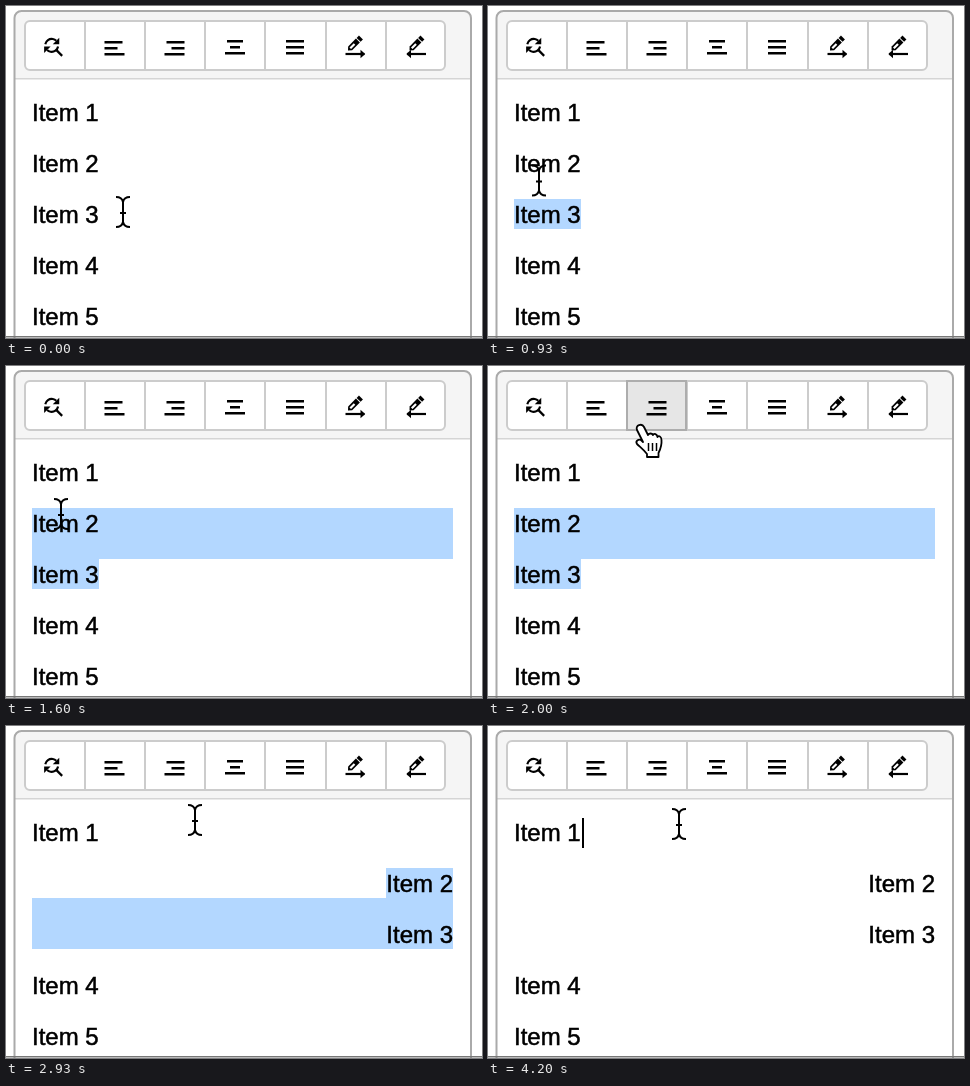
An HTML page with a canvas for the animation above (4.54 s loop, 476x332 px).

```html
<!DOCTYPE html>
<html lang="en">
<head>
<meta charset="utf-8">
<title>Aligning list items</title>
<style>
html, body { margin: 0; width: 100%; height: 100%; overflow: hidden; background: #fff; }
canvas { display: block; width: 476px; height: 332px; }
</style>
</head>
<body>
<canvas id="stage" width="476" height="332"></canvas>
<script>
const ctx = document.getElementById('stage').getContext('2d');
const LOOP = 4540;
const LEFT = 26, RIGHT = 447, PITCH = 51;
const INK = '#000', SELECTED = '#b3d7ff';

// Pointer samples: time, x, y
const POINTER = [
  [0, 117, 206], [800, 101, 204], [870, 74, 191], [930, 51, 174.5],
  [1000, 40, 161], [1070, 32, 151], [1130, 28, 147],
  [1600, 55, 148], [1670, 72, 131], [1730, 95, 112], [1800, 118, 93],
  [1870, 136, 77], [1930, 147, 67], [2000, 152, 60], [2070, 154, 58],
  [2670, 157, 61], [2730, 166, 69], [2800, 176, 80], [2870, 184, 89],
  [2930, 189, 94], [3000, 191, 97], [3070, 191, 98]
];

const within = (t, from, to) => t >= from && t < to;

function rect(x, y, w, h, color) {
  ctx.fillStyle = color;
  ctx.fillRect(x, y, w, h);
}

function polyline(points, width) {
  ctx.beginPath();
  points.forEach(([x, y]) => ctx.lineTo(x, y));
  ctx.lineWidth = width;
  ctx.stroke();
}

function polygon(points) {
  ctx.beginPath();
  points.forEach(([x, y]) => ctx.lineTo(x, y));
  ctx.fill();
}

function placed(x, y, draw) {
  ctx.save();
  ctx.translate(x, y);
  ctx.fillStyle = ctx.strokeStyle = INK;
  draw();
  ctx.restore();
}

function drawReplaceIcon() {
  placed(33.8, 27.5, () => {
    ctx.scale(1.08, 1.08);
    ctx.lineWidth = 2;
    for (const [from, to] of [[190, 315], [10, 135]]) {
      ctx.beginPath();
      ctx.arc(11, 11, 6, from * Math.PI / 180, to * Math.PI / 180);
      ctx.stroke();
    }
    polygon([[12, 10], [18, 10], [18, 4]]);
    polygon([[10, 12], [4, 12], [4, 18]]);
    polyline([[15.4, 15.4], [20.7, 20.7]], 2.1);
  });
}

function drawBars(x, y, widths, align) {
  widths.forEach((w, i) => rect(x + (20 - w) * align, y + i * 6, w, 2.5, INK));
}

function drawPencilIcon(x, dir) {
  placed(x, 48, () => {
    polyline([[-9.5, 0], [9.5, 0]], 2.2);
    polygon([[dir * 5.5, -4.2], [dir * 10.2, 0], [dir * 5.5, 4.2]]);
    ctx.translate(-7, -3.5);
    ctx.rotate(-Math.PI / 4);
    polygon([[0, 0], [3, -2.8], [14, -2.8], [14, 2.8], [3, 2.8]]);
    ctx.fillRect(15, -2.8, 3.3, 5.6);
    rect(3.2, -1.1, 6, 2.2, '#fff');
  });
}

function drawButtons(hovered, pressed) {
  const edge = i => Math.round(18 + 60.1 * i);
  ctx.lineWidth = 2;
  ctx.strokeStyle = '#ccc';
  ctx.fillStyle = '#fff';
  ctx.beginPath();
  ctx.roundRect(19, 15, 420, 49, 5);
  ctx.fill();
  ctx.stroke();
  for (let i = 1; i < 7; i++) rect(edge(i), 15, 2, 49, '#ccc');
  if (hovered) {
    ctx.fillStyle = pressed ? '#d4d4d4' : '#e6e6e6';
    ctx.strokeStyle = pressed ? '#8c8c8c' : '#adadad';
    ctx.fillRect(139, 15, 59, 49);
    ctx.strokeRect(139, 15, 59, 49);
  }
  drawReplaceIcon();
  drawBars(98.5, 35, [18, 13, 20], 0);
  drawBars(158.5, 35, [18, 13, 20], 1);
  drawBars(219, 34, [16, 10, 20], 0.5);
  drawBars(279, 34, [18, 18, 18], 0.5);
  drawPencilIcon(349, 1);
  drawPencilIcon(410.5, -1);
}

function drawEditor(t) {
  ctx.beginPath();
  ctx.roundRect(8.5, 5, 456.5, 350, 7);
  ctx.save();
  ctx.clip();
  rect(8, 5, 458, 68, '#f5f5f5');
  rect(8, 72, 458, 1.5, '#d5d5d5');
  ctx.restore();
  ctx.strokeStyle = '#aaa';
  ctx.lineWidth = 2;
  ctx.stroke();
  drawButtons(within(t, 2000, 2730), within(t, 2130, 2270));
}

function drawSelection(t) {
  const band = (x, y, right, bottom) => rect(x, y, right - x, bottom - y, SELECTED);
  if (within(t, 870, 2270)) {
    band(t < 930 ? 72.7 : LEFT, 193, 93, 223);
    if (t >= 1000) band(t < 1070 ? 39.4 : t < 1130 ? 32.7 : LEFT, 142, RIGHT, 193);
  } else if (within(t, 2270, 3070)) {
    band(380, 142, RIGHT, 172);
    band(LEFT, 172, RIGHT, 223);
  }
}

function drawItems(t) {
  ctx.font = '24px "Liberation Sans", Arial, sans-serif';
  ctx.fillStyle = ctx.strokeStyle = INK;
  ctx.lineWidth = 0.5;
  for (let n = 1; n <= 5; n++) {
    const moved = t >= 2270 && (n === 2 || n === 3);
    const line = ['Item ' + n, moved ? RIGHT : LEFT, 115 + PITCH * (n - 1)];
    ctx.textAlign = moved ? 'right' : 'left';
    ctx.fillText(...line);
    ctx.strokeText(...line);
  }
}

function drawCaret(t) {
  if (within(t, 70, 600)) rect(94, 194, 2, 30, INK);
  if (within(t, 3070, 3530) || t >= 4000) rect(94, 92, 2, 30, INK);
}

function drawBeam() {
  ctx.beginPath();
  for (const v of [-1, 1]) {
    for (const h of [-1, 1]) {
      ctx.moveTo(h * 7, v * 15);
      ctx.quadraticCurveTo(h, v * 15, 0, v * 10);
    }
  }
  ctx.moveTo(0, -11);
  ctx.lineTo(0, 11);
  ctx.moveTo(-3, 1);
  ctx.lineTo(3, 1);
  ctx.lineWidth = 2;
  ctx.stroke();
}

function drawHand() {
  const outline = new Path2D(
    'M-3 4C-5-1 2-3 4 1L8 9C9 7 12 7 13 9C14 7 17 8 17.5 11' +
    'C19 9 21.5 11 21.5 14C22 20 20 24 18.5 27V31H7V28' +
    'C4 24 0 21-3 18C-5 15-1 12 2 15L3 16Z');
  ctx.fillStyle = '#fff';
  ctx.lineWidth = 1.8;
  ctx.lineJoin = 'round';
  ctx.fill(outline);
  ctx.stroke(outline);
  for (const x of [8.5, 12.5, 16.5]) polyline([[x, 17], [x, 25]], 1.5);
}

function drawPointer(t) {
  const [, x, y] = POINTER.findLast(p => p[0] <= t);
  placed(x, y, within(t, 2000, 2730) ? drawHand : drawBeam);
}

function frame(now) {
  const t = now % LOOP;
  rect(0, 0, 476, 332, '#fff');
  drawEditor(t);
  drawSelection(t);
  drawItems(t);
  drawCaret(t);
  rect(0, 330, 476, 1.5, '#777');
  drawPointer(t);
}

const start = performance.now();
function tick() {
  frame(performance.now() - start);
  requestAnimationFrame(tick);
}
tick();
</script>
</body>
</html>
```
